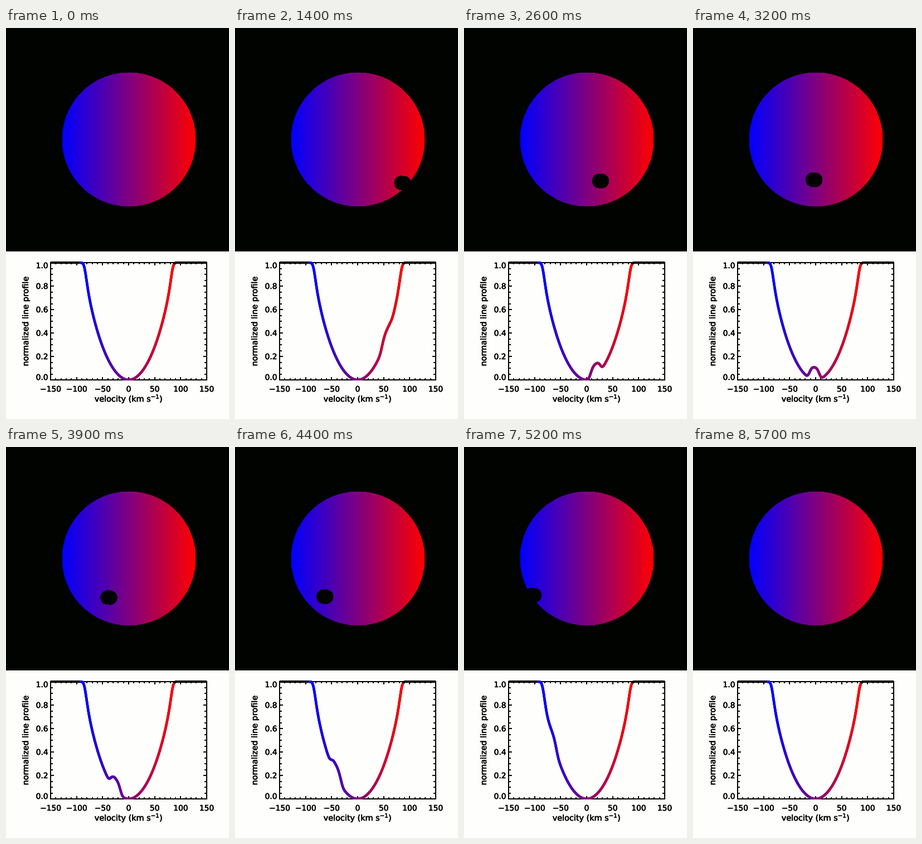
Write a matplotlib script that moves like this. It is 400 px wide and 700 px high and loops after 6600 ms.

```python
import numpy as np
import matplotlib.pyplot as plt
from matplotlib.animation import FuncAnimation
from matplotlib.collections import LineCollection
from matplotlib.patches import Rectangle
from matplotlib.patheffects import withStroke

plt.rcParams["font.family"] = "DejaVu Sans"

W, H, DPI = 400, 700, 100
PX = 72 / DPI                      # points per pixel
FRAMES, INTERVAL = 66, 100
FIRST, LAST = 10, 56               # frames with the planet in transit

SKY = np.array([1, 3, 1]) / 255
PAPER = np.array([254, 254, 252]) / 255

CX, CY, R = 220.5, 199.5, 120      # star
RP = 13                            # planet radius
STEP = np.array([-4.65, -0.324])   # planet motion per frame
START = np.array([319.3, 278.9])   # planet place in the first transit frame

VSINI, SIGMA, LIMB = 84, 3, 0.6
LEFT, RIGHT, TOP, BOTTOM = 80, 360, 420, 630


def planet_mask(k, x, y):
    """Planet smeared along its path during one exposure."""
    if not FIRST <= k <= LAST:
        return np.zeros(np.broadcast(x, y).shape, bool)
    mid = START + STEP * (k - FIRST)
    ends = [mid - STEP / 2, mid + STEP / 2]
    a, b = [(x - px) ** 2 + (y - py) ** 2 <= RP ** 2 for px, py in ends]
    return a | b


def blue_red(t):
    t = np.clip(t, 0, 1)
    return np.stack([t, 0 * t, 1 - t], axis=-1)


# Star picture on the pixel grid
gx, gy = np.meshgrid(np.arange(400) + 0.5, np.arange(400) + 0.5)
on_star = (gx - CX) ** 2 + (gy - CY) ** 2 <= R ** 2
star = np.where(on_star[..., None], blue_red((gx - CX + R) / (2 * R)), SKY)

# Limb-darkened surface: one column per velocity
vel = np.arange(-150, 150.25, 0.5)
col_x = CX + vel[None, :] / VSINI * R
row_y = CY + np.arange(-R + 0.25, R, 0.5)[:, None]
mu2 = 1 - ((col_x - CX) ** 2 + (row_y - CY) ** 2) / R ** 2
surface = np.where(mu2 > 0, 1 - LIMB * (1 - np.sqrt(np.maximum(mu2, 0))), 0)

kernel = np.exp(-0.5 * (np.arange(-16, 16.25, 0.5) / SIGMA) ** 2)
kernel /= kernel.sum()


def line_depth(k):
    flux = np.where(planet_mask(k, col_x, row_y), 0, surface).sum(axis=0)
    return np.convolve(flux, kernel, mode="same")


full_depth = line_depth(0).max()


def to_x(v):
    return LEFT + (v + 150) / 300 * (RIGHT - LEFT)


def to_y(p):
    return BOTTOM - p * (BOTTOM - TOP)


def curve(k):
    return np.column_stack([to_x(vel), to_y(1 - line_depth(k) / full_depth)])


def segments(pts):
    pts = pts[colored]
    return np.stack([pts[:-1], pts[1:]], axis=1)


colored = (vel > -93) & (vel < 87)

fig = plt.figure(figsize=(W / DPI, H / DPI), dpi=DPI, facecolor=PAPER)
ax = fig.add_axes([0, 0, 1, 1])
picture = ax.imshow(star, extent=(0, 400, 400, 0), interpolation="nearest",
                    aspect="auto")
ax.set_xlim(0, W)
ax.set_ylim(H, 0)
ax.axis("off")

# Plot frame and inward ticks
ax.add_patch(Rectangle((LEFT, TOP), RIGHT - LEFT, BOTTOM - TOP, fill=False,
                       lw=2 * PX, ec="black"))


def tick(x, y, dx, dy):
    ax.plot([x, x + dx], [y, y + dy], color="black", lw=2 * PX,
            solid_capstyle="butt")


for i in range(31):
    size = 5 if i % 5 == 0 else 3
    x = to_x(-150 + 10 * i)
    tick(x, BOTTOM, 0, -size)
    tick(x, TOP, 0, size)
for i in range(21):
    size = 6 if i % 4 == 0 else 4
    y = to_y(i / 20)
    tick(LEFT, y, size, 0)
    tick(RIGHT, y, -size, 0)


def label(x, y, text, size=13.8, ha="center", **kw):
    ax.text(x, y, text, fontsize=size * PX, color="black", ha=ha,
            va="baseline",
            path_effects=[withStroke(linewidth=0.6 * PX, foreground="black")],
            **kw)


for v in range(-150, 151, 50):
    label(to_x(v), 651, str(v).replace("-", "\u2212"))
for i in range(6):
    # the end labels stay inside the frame's height
    shift = {0: 0, 5: 10}.get(i, 5)
    label(75.5, to_y(i / 5) + shift, f"{i / 5:.1f}", ha="right")
label(220, 669, "velocity (km s$^{-1}$)", 14.4)
label(40, 525, "normalized line profile", 14.4, rotation=90,
      rotation_mode="anchor")

# Line profile: black underneath, coloured by velocity on top
base, = ax.plot([], [], color="black", lw=4.4 * PX, zorder=4)
shades = blue_red((vel[colored] / VSINI + 1) / 2)
profile = LineCollection([], colors=shades[:-1], linewidths=4.4 * PX,
                         capstyle="round", zorder=5)
ax.add_collection(profile, autolim=False)
window = Rectangle((LEFT, TOP - 2), RIGHT - LEFT, BOTTOM - TOP + 3,
                   transform=ax.transData)
base.set_clip_path(window)
profile.set_clip_path(window)


def draw(k):
    picture.set_data(np.where(planet_mask(k, gx, gy)[..., None], SKY, star))
    pts = curve(k)
    base.set_data(pts[:, 0], pts[:, 1])
    profile.set_segments(segments(pts))
    return picture, base, profile


anim = FuncAnimation(fig, draw, frames=FRAMES, interval=INTERVAL,
                     repeat=True, repeat_delay=0, blit=False)
plt.show()
```
